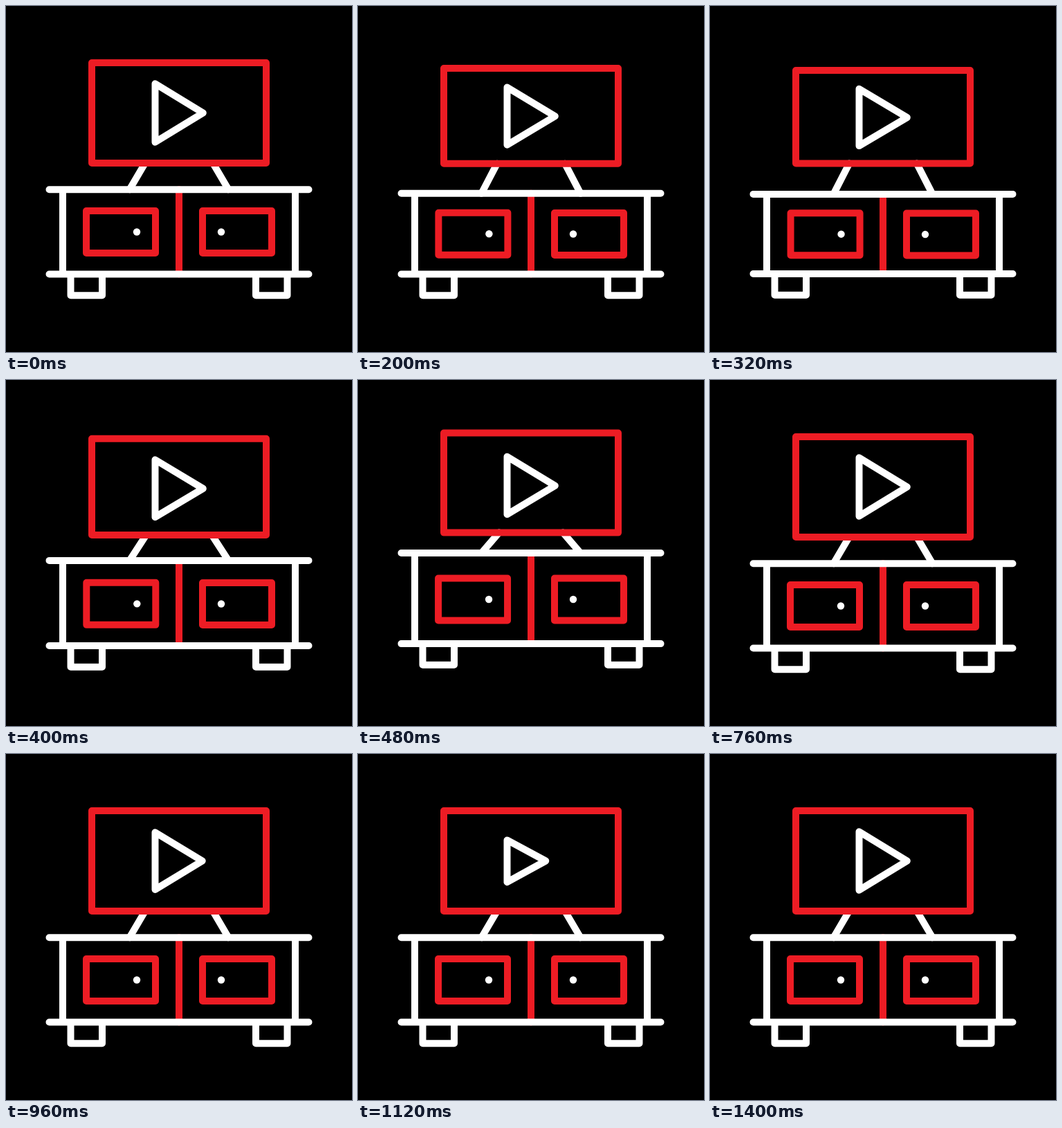
These frames come from a looping animation (500 by 500 pixels, 1480 ms). An HTML page:

```html
<!DOCTYPE html>
<html lang="en">
<head>
<meta charset="utf-8">
<title>TV stand</title>
<style>
  html, body { margin: 0; width: 100%; height: 100%; overflow: hidden; background: #000; }
  svg { display: block; width: 100vw; height: 100vh; }
  path { fill: none; stroke: #fff; stroke-width: 10; stroke-linecap: round; stroke-linejoin: round; }
  .red { stroke: #ed1c24; }
  circle { fill: #fff; }
</style>
</head>
<body>
<svg viewBox="0 0 500 500">
  <path id="legs"/>
  <path id="screen" class="red"/>
  <path id="play"/>
  <path id="divider" class="red"/>
  <path id="cabinet"/>
  <g id="leftDrawer">
    <path class="red" d="M116 296H216V357H116Z"/>
    <circle cx="189" cy="326.5" r="5.2"/>
  </g>
  <g id="rightDrawer">
    <path class="red" d="M284 296H384V357H284Z"/>
    <circle cx="311" cy="326.5" r="5.2"/>
  </g>
</svg>
<script>
const LOOP = 1480, STEP = 40;
const el = id => document.getElementById(id);
const draw = (id, d) => el(id).setAttribute('d', d);
const move = (id, x, y) => el(id).setAttribute('transform', `translate(${x} ${y})`);

// Smooth 0..1 progress between two times
function ease(t, from, to) {
  const p = Math.min(1, Math.max(0, (t - from) / (to - from)));
  return p * p * (3 - 2 * p);
}

function render(t) {
  const down = ease(t, 80, 280), up = ease(t, 280, 520), back = ease(t, 520, 760);
  const pulse = ease(t, 920, 1160) - ease(t, 1160, 1400);
  const bounce = (rest, squash, peak) =>
    rest + (squash - rest) * down + (peak - squash) * up + (rest - peak) * back;

  const tvTop = bounce(82, 94.4, 75);
  const tvBottom = bounce(227, 228, 220);
  const top = bounce(265.3, 273.8, 248);
  const base = bounce(387.5, 387.5, 380.6);
  const feet = bounce(418.3, 418.3, 411.3);
  const legX = bounce(201, 201, 204);

  draw('screen', `M124 ${tvTop}H376V${tvBottom}H124Z`);
  draw('legs', `M${legX} ${tvBottom}L178.5 ${top}M${500 - legX} ${tvBottom}L321.5 ${top}`);
  draw('divider', `M250 ${top}V${base}`);
  draw('cabinet', `M62.5 ${top}H437.5M62.5 ${base}H437.5` +
    `M82 ${top}V${base}M418 ${top}V${base}` +
    `M93.5 ${base}V${feet}H139V${base}M361 ${base}V${feet}H406.5V${base}`);

  const playTop = bounce(112.2, 120.5, 110) + 13.2 * pulse;
  const playTip = bounce(154.5, 161.8, 152);
  const playBottom = bounce(196.8, 202.8, 193.5) - 12.6 * pulse;
  draw('play', `M215.5 ${playTop}L${284.8 - 14.6 * pulse} ${playTip}L215.5 ${playBottom}Z`);

  move('leftDrawer', bounce(0, 0.6, 0), bounce(0, 4.3, -10.6));
  move('rightDrawer', 0, bounce(0, 4.7, -10.6));
}

const start = performance.now();
function tick() {
  const t = (performance.now() - start) % LOOP;
  render(Math.floor(t / STEP) * STEP);
  requestAnimationFrame(tick);
}
render(0);
requestAnimationFrame(tick);
</script>
</body>
</html>
```
